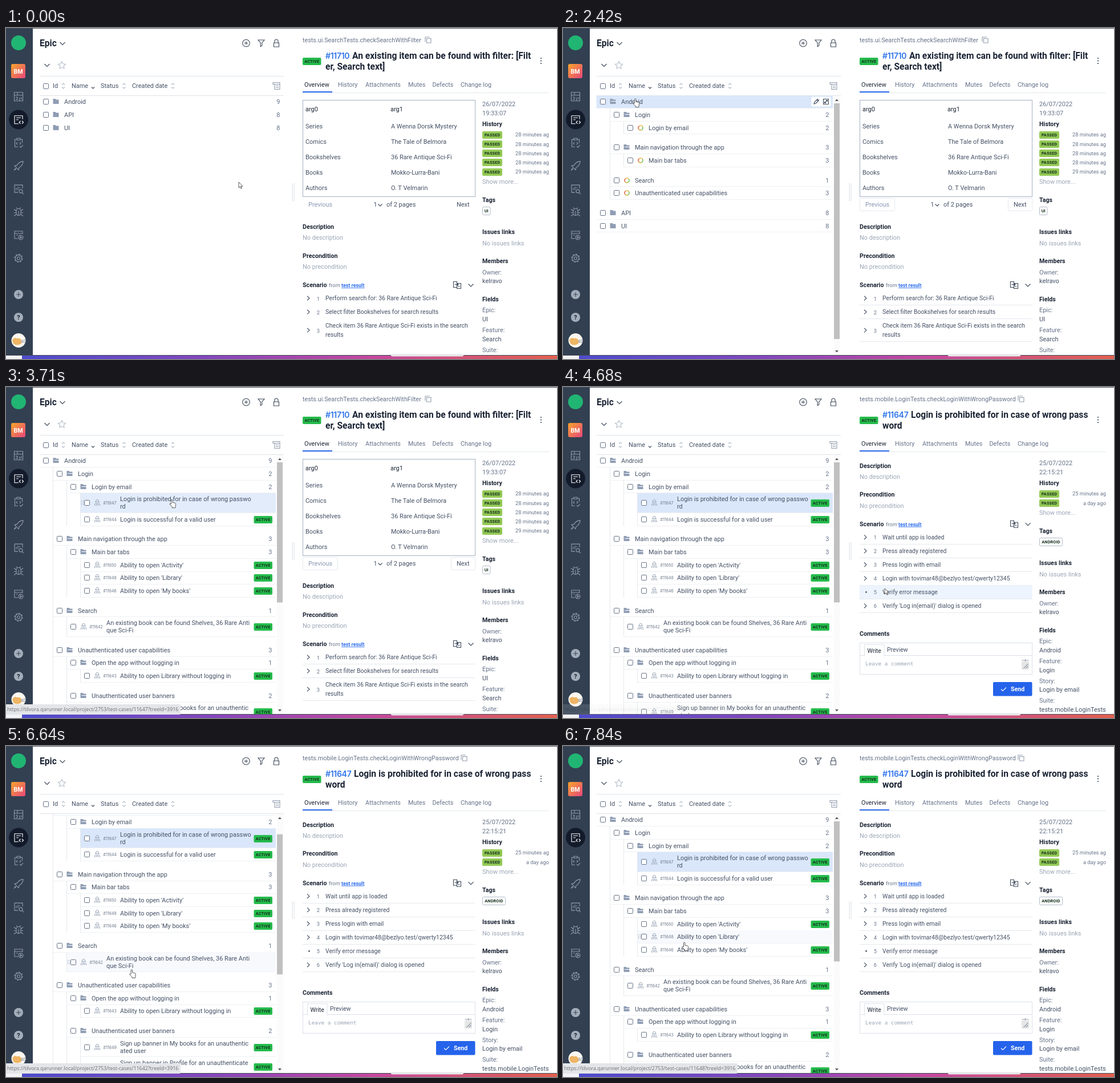
An HTML page that plays this animation: 966 by 580 pixels, repeating every 7.99 s.

```html
<!DOCTYPE html>
<html lang="en">
<head>
<meta charset="utf-8">
<title>Test case browser</title>
<style>
html, body { margin: 0; width: 100%; height: 100%; overflow: hidden; background: #fff; }
svg { display: block; width: 966px; height: 580px; }
text { font: 10.95px Roboto, Arial, sans-serif; fill: #455166; white-space: pre; }
.b { font-weight: 600; font-size: 10.7px; fill: #1b2434; }
.h { font-weight: 600; font-size: 15.6px; fill: #1b2434; }
.id { font: 600 14px Inter, sans-serif; letter-spacing: -.3px; fill: #2f74ea; }
.num { font: 7px Inter, sans-serif; fill: #6b7789; }
.tag { font-weight: 700; font-size: 7.3px; letter-spacing: .15px; fill: #14301d; }
.step { font-size: 10.5px; }
.tab { font-size: 10.8px; }
.sm { font-size: 9.35px; fill: #67748a; }
.g { fill: #66738a; }
.l { fill: #9ba6b6; }
.d { fill: #1b2434; }
.prev { fill: #8798b2; }
.white { fill: #fff; }
.link { font-weight: 600; font-size: 8.9px; fill: #2f6fed; text-decoration: underline; }
.mono { font: 9.4px "Noto Sans Mono", monospace; fill: #98a3b3; }
.url { font: 8.87px "Open Sans", sans-serif; fill: #696d73; }
.r { text-anchor: end; }
.m { text-anchor: middle; }
.i { fill: none; stroke: #3c485a; stroke-width: 1.1; }
.s { stroke: #919cac; }
.w { stroke: #fff; }
.p { stroke: #9ba7b7; stroke-width: 1; }
.faint { stroke: #b3bcc9; }
.cursor { fill: #fff; stroke: #333; stroke-width: .8; }
</style>
</head>
<body>
<svg id="stage" viewBox="0 0 966 580">
  <defs>
    <linearGradient id="sky">
      <stop offset="0" stop-color="#4d4ccc"/><stop offset=".35" stop-color="#8547bd"/>
      <stop offset=".65" stop-color="#c4489f"/><stop offset="1" stop-color="#e2604f"/>
    </linearGradient>
    <linearGradient id="warm" x2="1" y2="1">
      <stop offset="0" stop-color="#f8a42c"/><stop offset="1" stop-color="#e8467c"/>
    </linearGradient>
    <clipPath id="treeClip"><path d="M47 118.500h440V573H47z"/></clipPath>
    <clipPath id="sideClip"><path d="M510 0h442V573H510z"/></clipPath>
  </defs>
  <g id="scene"></g>
</svg>
<script>
const LOOP = 7990, STEP = 133.2, ROW = 22.65, TALL = 34.5, GAP = 12;
const clamp = v => Math.max(0, Math.min(1, v));
const ease = v => (v = clamp(v), v * v * (3 - 2 * v));

// Drawing helpers
const text = (x, y, s, c = '') => `<text x="${x}" y="${y}" class="${c}">${s}</text>`;
const rect = (x, y, w, h, fill, more = '') => `<rect x="${x}" y="${y}" width="${w}" height="${h}" fill="${fill}" ${more}/>`;
const frame = (x, y, w, h, color, r = 0) => rect(x, y, w, h, 'none', `stroke="${color}" rx="${r}"`);
const dot = (x, y, r, fill) => `<circle cx="${x}" cy="${y}" r="${r}" fill="${fill}"/>`;
const icon = (x, y, d, c = '', more = '') => `<path class="i ${c}" transform="translate(${x} ${y})" d="${d}" ${more}/>`;
const hline = (x, y, x2, color = '#e9ecf0') => rect(x, Math.round(y), x2 - x, 1, color);
const ring = r => `M${r} 0a${r} ${r} 0 1 1-${2 * r} 0a${r} ${r} 0 1 1 ${2 * r} 0z`;
const box = (x, y) => rect(x - 4.5, y - 4.5, 9, 9, '#fff', 'stroke="#667386" rx="1"');
const DOWN = 'M-4.500-2L0 2.500 4.500-2', RIGHT = 'M-2-3.800L2 0-2 3.800';

function badge(x, mid, w, s, fill) {
  const y = Math.round(mid - 6.5);
  return rect(x, y, w, 13, fill, 'rx="2"') + text(x + w / 2, y + 9.3, s, 'tag m');
}
const active = (x, mid) => badge(x, mid, 32.5, 'ACTIVE', '#25bb4c');

// Tree data
const folder = (name, count, kids) => ({ key: name, name, count, kids });
const leaf = (id, ...lines) => ({ key: id, id, lines });
const TREE = [
  folder('Android', 9, [
    folder('Login', 2, [
      folder('Login by email', 2, [
        leaf(11647, 'Login is prohibited for in case of wrong passwo', 'rd'),
        leaf(11644, 'Login is successful for a valid user')])]),
    folder('Main navigation through the app', 3, [
      folder('Main bar tabs', 3, [
        leaf(11650, "Ability to open 'Activity'"),
        leaf(11648, "Ability to open 'Library'"),
        leaf(11646, "Ability to open 'My books'")])]),
    folder('Search', 1, [
      leaf(11642, 'An existing book can be found Shelves, 36 Rare Anti', 'que Sci-Fi')]),
    folder('Unauthenticated user capabilities', 3, [
      folder('Open the app without logging in', 1, [
        leaf(11643, 'Ability to open Library without logging in')]),
      folder('Unauthenticated user banners', 2, [
        leaf(11649, 'Sign up banner in My books for an unauthentic', 'ated user'),
        leaf(11645, 'Sign up banner in Profile for an unauthenticate', 'd user')])])]),
  folder('API', 8), folder('UI', 8)];
const EARLY = ['Android', 'Login', 'Main navigation through the app'];

// Timeline
const PATH = [[0, 408, 270], [200, 408, 270], [1150, 121, 131], [1300, 127, 124], [2900, 127, 124],
  [3550, 291, 197], [4150, 291, 197], [4600, 564, 353], [4750, 564, 353], [5250, 300, 452],
  [5550, 262, 380], [5700, 250, 388], [5950, 237, 413], [6350, 237, 413], [6700, 220, 391],
  [7150, 220, 391], [7650, 213, 344], [8100, 213, 344]];
const HOVER = [[780, 'UI', 900], [900, 'API', 1030], [1030, 'Android', 2980], [2980, 'Login', 3120],
  [3120, 'Login by email', 3330], [3330, 11647, 4250], [5150, 'Unauthenticated user capabilities', 5400],
  [5400, 11642, 5500], [5500, 'Search', 5940], [5940, 11642, 6700],
  [6800, 'Open the app without logging in', 7000], [7000, 11643, 7450], [7790, 11648, 8100]];
const STATUS = [[3450, 11647, 4300], [6380, 11642, 7050], [7050, 11643, 7740], [7740, 11648, 8100]];

const at = (list, t) => list.find(([from, , to]) => t >= from && t < to)?.[1];
const scrollAt = t => 109 * (ease((t - 6500) / 380) - ease((t - 7420) / 360));

function pointer(t) {
  const i = PATH.findIndex(k => k[0] > t), [t0, x0, y0] = PATH[i - 1], [t1, x1, y1] = PATH[i];
  const p = ease((t - t0) / (t1 - t0)), x = x0 + (x1 - x0) * p, y = y0 + (y1 - y0) * p;
  const hand = t > 780 && t < 4250 || t > 5050;
  return icon(x, y, hand
    ? 'M-1.500 8V1.200a1.200 1.200 0 0 1 2.400 0v4l4.500 1q1.600.5 1.300 2.500l-.8 4v2h-5.500v-1.700l-4-4q-.9-1.500.6-1.700z'
    : 'M0 0v10l2.400-2.100 1.600 3.500 1.500-.7-1.600-3.400h3.100z', 'cursor');
}

function sidebar() {
  const items = [
    'M-7.500-7.500h15v15h-15zM-7.500-2.500h15M-2-7.500v5M2 7.500v-6M-5 1h3v4h-3M5 1v4',
    'M7-1v-6H-7V7H0M-4-3.500h8M-4 0h4M3.500 2L1 4.500 3.500 7M6 2l2.500 2.500L6 7',
    'M-3-6h-3.500V7H-1M3-6h3.500v6M-3-8h6v3h-6zM-2-1l-2 2 2 2M2-1l2 2-2 2M2 6l2 2 4-4',
    'M8-8C2-8-1-4-3-1l-4 1 7 7 1-4c3-2 7-5 7-11zM-5 4l-3 4 4-3',
    'M7-1v-6H-7V6H-1M-4 2v-4M-1 2v-6M2-1v-2M7 4a3 3 0 1 1-6 0 3 3 0 1 1 6 0M6 6l3 3',
    'M-4-2a4 4 0 0 1 8 0v4a4 4 0 0 1-8 0zM0-2v8M-8-5l4 3M8-5L4-2M-8 1h4M4 1h4M-8 7l4-3M8 7L4 4M-2-6l-2-2M2-6l2-2',
    'M7-2v-5H-7V6H-1M-7-3H7M-4 0h3M8 4A4 4 0 1 1 0 4a4 4 0 1 1 8 0M3 2l3 2-3 2z',
    ring(2.5) + ring(5.8)];
  return rect(0, 0, 47, 580, '#324052') + dot(22, 26, 13, '#21b573') +
    rect(9, 63, 25, 25, 'url(#warm)', 'rx="3"') + text(21.5, 79.5, 'BM', 'b m white') +
    dot(22, 160.5, 17, '#131b2b') +
    items.map((d, i) => icon(22, 120.3 + i * 40.45, d, i == 1 ? 'w' : 's')).join('') +
    icon(22, 403.4, ring(7), 's', 'stroke-dasharray="2.75"') +
    dot(22, 467, 8, '#a3adba') + dot(22, 507, 8, '#a3adba') +
    icon(22, 467, 'M-4 0h8M0-4v8') + text(22, 511, '?', 'b m') +
    dot(22, 547.5, 12.5, '#fbf7f0') +
    '<path d="M11 547q4-6 8-3 5-2 8 3v6q-8 5-14 0z" fill="#eeb565"/>' + text(26, 552, '40', 'num');
}

function header() {
  const sort = x => icon(x, 101.5, 'M-2.500-2L0-4.500 2.500-2M-2.500 2L0 4.500 2.500 2', 'faint');
  return text(59, 31.5, 'Epic', 'h') + icon(99, 27, DOWN) +
    icon(421, 26.5, ring(6.3) + 'M-3 0h6M0-3v6') +
    icon(447.5, 26.5, 'M-5.500-5.500h11L1.300-.5v5L-1.300 6v-6.500z') +
    icon(474, 27, 'M-4.500-1h9v7h-9zM-3-1v-3a3 3 0 0 1 6 0v3') +
    icon(72, 65, DOWN) +
    icon(98, 65, 'M0-6.500l2 4.200 4.500.6-3.300 3.200.8 4.500-4-2.200-4 2.200.8-4.500-3.300-3.200 4.500-.6z', 'faint') +
    hline(59, 84, 487, '#dfe3e9') + box(70, 102) +
    text(82, 105, 'Id') + text(115, 105, 'Name') + text(166, 105, 'Status') + text(221, 105, 'Created date') +
    [100.5, 207, 292.5].map(sort).join('') + icon(152.5, 103.5, 'M-2.500 0L0 2.500 2.500 0') +
    icon(474, 101.5, 'M-6-6h12v3h-12zM-3-3v9h9v-9M-1 0h5M-1 3h5', 's') +
    hline(59, 118, 487, '#dfe3e9');
}

function spinner(x, y, t) {
  return ['#e8563f', '#f3b53c', '#6cc04f', '#c9b23a'].map((c, i) =>
    `<circle cx="${x}" cy="${y}" r="4" fill="none" stroke="${c}" stroke-width="1.6" pathLength="4" ` +
    `stroke-dasharray="1 3" transform="rotate(${t * .36 + i * 90} ${x} ${y})"/>`).join('');
}

function tree(t) {
  const started = t >= 2000, children = t >= 2250, full = t >= 2600;
  const end = started ? 473 : 487, edge = end - 6.5, hovered = at(HOVER, t);
  const picked = t >= 3900 ? 11647 : started && t < 2950 ? 'Android' : 0;
  const isOpen = n => n.kids && (full || children && EARLY.includes(n.key));
  let out = '';

  function row(n, d, y, h) {
    const x = 70 + 24 * d, left = 58.5 + 24 * d, mid = Math.round(y + h / 2), hot = n.key === hovered;
    if (n.key === picked) out += rect(left, y, end - left, h, '#dae7fa');
    else if (hot) out += rect(left, y, end - left, h, n.key == 11647 ? '#e2ecfa' : '#f7f9fd');
    if (started) out += hline(left, y + h - .5, end, '#eef0f3');
    out += box(x, mid);
    if (n.id) {
      out += icon(x + 18, mid, 'M-2.500-3a2.500 2.500 0 0 1 5 0v1.500h-5zM-4-1.500h8M-4.500 5v-2q0-2 2-2h5q2 0 2 2v2M-2 5v-2h4v2', 'p');
      out += text(x + 28.5, mid + 3.2, '#' + n.id, 'num');
      n.lines.forEach((s, i) => out += text(x + 58, mid + (n.lines[1] ? 13 * i - 2.7 : 3.8), s));
      if (!hot) out += active(434.5, mid);
      else for (let i = 0; i < 6; i++) out += rect(x - 10 + i % 2 * 3, mid - 4 + (i >> 1) * 3, 1.3, 1.3, '#9ba7b7');
      return;
    }
    const loading = n.kids && started && !isOpen(n);
    out += loading ? spinner(x + 18, mid, t) :
      `<path transform="translate(${x + 12.5} ${mid - 5})" d="M0 0h4l1.500 1.500H10V9H0z" fill="#8f9db3"/>` +
      (isOpen(n) ? rect(x + 14.5, mid - 1, 9, 1, '#fff') : '');
    out += text(x + 32, mid + 3.8, n.name);
    if (!hot) out += text(edge, mid + 3.8, n.count, 'r g');
    else out += rect(edge - 31, mid - 8.5, 34, 17, '#fff', 'rx="2"') +
      icon(edge - 22.5, mid, 'M-4 4l.8-3 5.500-5.500 2.200 2.200L-1 3.200zM1-3l2.200 2.200') +
      icon(edge - 5.5, mid, 'M-4.500-4.500h9v9h-9zM0-2.500h2.500V0M0 2.500h-2.500V0M2.500-2.500l-5 5');
  }

  function place(nodes, d, y) {
    let gap = 0;
    for (const n of nodes) {
      const h = n.lines?.[1] ? TALL : ROW;
      y += gap;
      row(n, d, y, h);
      y += h;
      gap = 0;
      if (isOpen(n)) {
        const top = y;
        y = place(n.kids, d + 1, y);
        out += rect(82 + 24 * d, top, 1, y - top, '#e4e8ed');
        gap = GAP;
      }
    }
    return y;
  }

  const scroll = scrollAt(t);
  place(TREE, 0, 118 - scroll);
  const bar = started ? rect(475, 119, 11, 454, '#fbfbfb') +
    rect(475, 132 + scroll * .545, 10, full ? 245.5 : 413, '#c0c0c0') +
    '<path d="M477 128l3-3.500 3 3.500zM477 565l3 3.500 3-3.500z" fill="#555"/>' : '';
  return `<g clip-path="url(#treeClip)">${out}${bar}</g>`;
}

const CASES = [{
  path: 'tests.ui.SearchTests.checkSearchWithFilter', copy: 740, id: '#11710', tx: 607,
  title: ['An existing item can be found with filter: [Filt', 'er, Search text]'],
  date: ['26/07/2022', '19:33:07'], runs: [28, 28, 28, 28, 29].map(n => n + ' minutes ago'),
  tag: 'UI', tagW: 14.5, dy: 0, dr: 0,
  fields: [['Epic', 'UI'], ['Feature', 'Search'], ['Suite', '']],
  steps: [['Perform search for: 36 Rare Antique Sci-Fi'], ['Select filter Bookshelves for search results'],
    ['Check item 36 Rare Antique Sci-Fi exists in the search', 'results']]
}, {
  path: 'tests.mobile.LoginTests.checkLoginWithWrongPassword', copy: 803, id: '#11647', tx: 610,
  title: ['Login is prohibited for in case of wrong pass', 'word'],
  date: ['25/07/2022', '22:15:21'], runs: ['25 minutes ago', 'a day ago'],
  tag: 'ANDROID', tagW: 41, dy: -210.3, dr: -49,
  fields: [['Epic', 'Android'], ['Feature', 'Login'], ['Story', 'Login by email'], ['Suite', 'tests.mobile.LoginTests']],
  steps: [['Wait until app is loaded'], ['Press already registered'], ['Press login with email'],
    ['Login with tovimar48@bezlyo.test/qwerty12345'], ['Verify error message'], ["Verify 'Log in(email)' dialog is opened"]]
}];

function table(t) {
  const cells = [['Series', 'A Wenna Dorsk Mystery'], ['Comics', 'The Tale of Belmora'],
    ['Bookshelves', '36 Rare Antique Sci-Fi'], ['Books', 'Mokko-Lurra-Bani'], ['Authors', 'O. T Velmarin']];
  let out = frame(520.5, 126.5, 302, 169, '#a4b1c4') + text(525, 146, 'arg0', 'd') + text(674, 146, 'arg1', 'd');
  cells.forEach(([a, b], i) => out += text(525, 176 + i * 27.1, a) + text(675, 176 + i * 27.1, b));
  if (t >= 2000) out += frame(520.5, 298.5, 61, 22, '#e4e8ed', 2) + frame(780.5, 298.5, 42, 22, '#e4e8ed', 2);
  return out + text(530, 313, 'Previous', 'prev') + text(644.5, 313, '1') +
    icon(656, 310, 'M-3.500-1.500L0 2l3.500-3.500') + text(667, 313, 'of 2 pages') + text(790, 313, 'Next');
}

function comments() {
  return text(520, 436, 'Comments', 'b') + frame(520.5, 448.5, 302, 55, '#dbe1e9') + hline(521, 470, 822, '#dbe1e9') +
    rect(528.5, 451.5, 34.5, 20, '#fff', 'stroke="#dbe1e9"') + rect(529, 470, 33.5, 2, '#fff') +
    text(533.5, 465.5, 'Write', 'step d') + text(568, 463.5, 'Preview', 'step') +
    text(530, 488, 'Leave a comment', 'mono') +
    rect(804, 481, 13, 14, '#e6e6e6') + icon(810.5, 488, 'M-3 5l8-8M1 5l4-4M-6-9h12M0-11v4', 's') +
    rect(754, 517, 68.5, 24.5, '#2563eb', 'rx="2"') +
    icon(772.5, 529.5, 'M-4.500 0L-1.500 3 4.500-3', 'w') + text(785, 533, 'Send', 'b white');
}

function detail(t) {
  const second = t >= 3950, c = CASES[+second], { dy, dr } = c;
  let out = text(520, 24.5, c.path, 'g tab') +
    icon(c.copy, 21, 'M-2.500-2.500h7.500v7.500h-7.500zM-5 3v-8h8', 's') +
    active(520, 58) + text(560, 54, c.id, 'id') +
    text(c.tx, 54, c.title[0], 'h') + text(560, 73, c.title[1], 'h') +
    [53, 57.5, 62].map(y => dot(938, y, 1.1, '#3c485a')).join('');

  const tabs = { Overview: 523, History: 582, Attachments: 630, Mutes: 705, Defects: 747.5, 'Change log': 797 };
  for (const name in tabs) out += text(tabs[name], 103, name, name == 'Overview' ? 'd tab' : 'g tab');
  out += hline(520, 113, 952, '#e2e6eb') + rect(520, 111, 52, 2, '#2f6fed');

  out += second ? comments() : table(t);
  out += text(520, 352 + dy, 'Description', 'b') + text(520, 371 + dy, 'No description', 'l') +
    text(520, 402.5 + dy, 'Precondition', 'b') + text(520, 422 + dy, 'No precondition', 'l') +
    text(520, 454 + dy, 'Scenario', 'b') + text(566, 454 + dy, 'from', 'sm') + text(588, 454 + dy, 'test result', 'link') +
    icon(791, 450.5 + dy, 'M-.5-3v-3h-6v10h6v-4M-.5-3h7v9h-7zM-4.500-1h6M0-3l2 2-2 2M4.500 2.500H1') +
    icon(815, 450.5 + dy, DOWN);

  let y = 473.5 + dy;
  c.steps.forEach((lines, i) => {
    const two = lines.length > 1, mid = two ? y + 8 : y, bullet = second && i == 4;
    if (bullet && t > 4450 && t < 4850) out += rect(520, y - 12, 302.5, 24, '#edf4fd');
    out += bullet ? dot(531.5, mid, 1.3, '#3c485a') : icon(530, mid, RIGHT);
    out += text(547.5, mid + 4, i + 1, 'sm m');
    lines.forEach((s, k) => out += text(560, y + 3.7 + k * 15.5, s, 'step'));
    if (t >= 2000) out += hline(520, y + (two ? 27.5 : 11.8), 822.5, '#e4e8ed');
    y += 24.05;
  });

  const side = (y, s, cls) => out += text(835, y, s, cls);
  side(137, c.date[0], 'g');
  side(152.5, c.date[1], 'g');
  side(172, 'History', 'b');
  c.runs.forEach((s, i) => {
    const y = 187 + i * 16.3, long = s.length > 9;
    out += badge(835, y, 35, 'PASSED', '#94c956') + text(long ? 893 : 952, y + 3.2, s, long ? 'sm' : 'sm r');
  });
  side(273 + dr, 'Show more...', 'l');
  side(305 + dr, 'Tags', 'b');
  out += frame(835.5, 313.5 + dr, c.tagW - 1, 14, '#b4bdc9', 2) + text(835 + c.tagW / 2, 323.2 + dr, c.tag, 'tag m');
  side(361 + dr, 'Issues links', 'b');
  side(380.5 + dr, 'No issues links', 'l');
  side(412 + dr, 'Members', 'b');
  side(431.5 + dr, 'Owner:', 'g');
  side(447 + dr, 'kelravo');
  side(479 + dr, 'Fields', 'b');
  c.fields.forEach(([k, v], i) => {
    side(498 + dr + i * 34.8, k + ':', 'g');
    side(513.7 + dr + i * 34.8, v);
  });
  return `<g clip-path="url(#sideClip)">${out}</g>`;
}

function divider() {
  let out = '';
  for (let i = 0; i < 22; i++) out += rect(501.5 + i % 2 * 3, 273 + (i >> 1) * 2.8, 1.2, 1.2, '#b9c0ca');
  return out;
}

function status(t) {
  const s = STATUS.findLast(k => t >= k[0]);
  if (!s) return '';
  const url = `https://tilvora.qarunner.local/project/2753/test-cases/${s[1]}?treeId=3916`;
  return `<g opacity="${clamp(1 - (t - s[2]) / 420)}">` +
    rect(-2, 556, 308, 18, '#e3e5e8', 'rx="2"') + text(2, 568, url, 'url') + '</g>';
}

// Window edges and the desktop below
const desktop = () => hline(0, 0, 966, '#454b58') + hline(0, 573, 966, '#454b58') +
  rect(0, 574, 28, 6, '#f4f4f6') + rect(28, 574, 938, 6, 'url(#sky)') +
  rect(675, 571.5, 127, 4, '#e6e8ea', 'rx="2"');

const scene = document.getElementById('scene');
let shown = -1;
function tick(now) {
  const n = Math.floor((now % LOOP + 25) / STEP), t = n * STEP;
  if (n !== shown) {
    shown = n;
    scene.innerHTML = rect(0, 0, 966, 580, '#fff') + sidebar() + header() + tree(t) + divider() +
      detail(t) + desktop() + status(t) + pointer(t);
  }
  requestAnimationFrame(tick);
}
tick(0);
</script>
</body>
</html>
```
